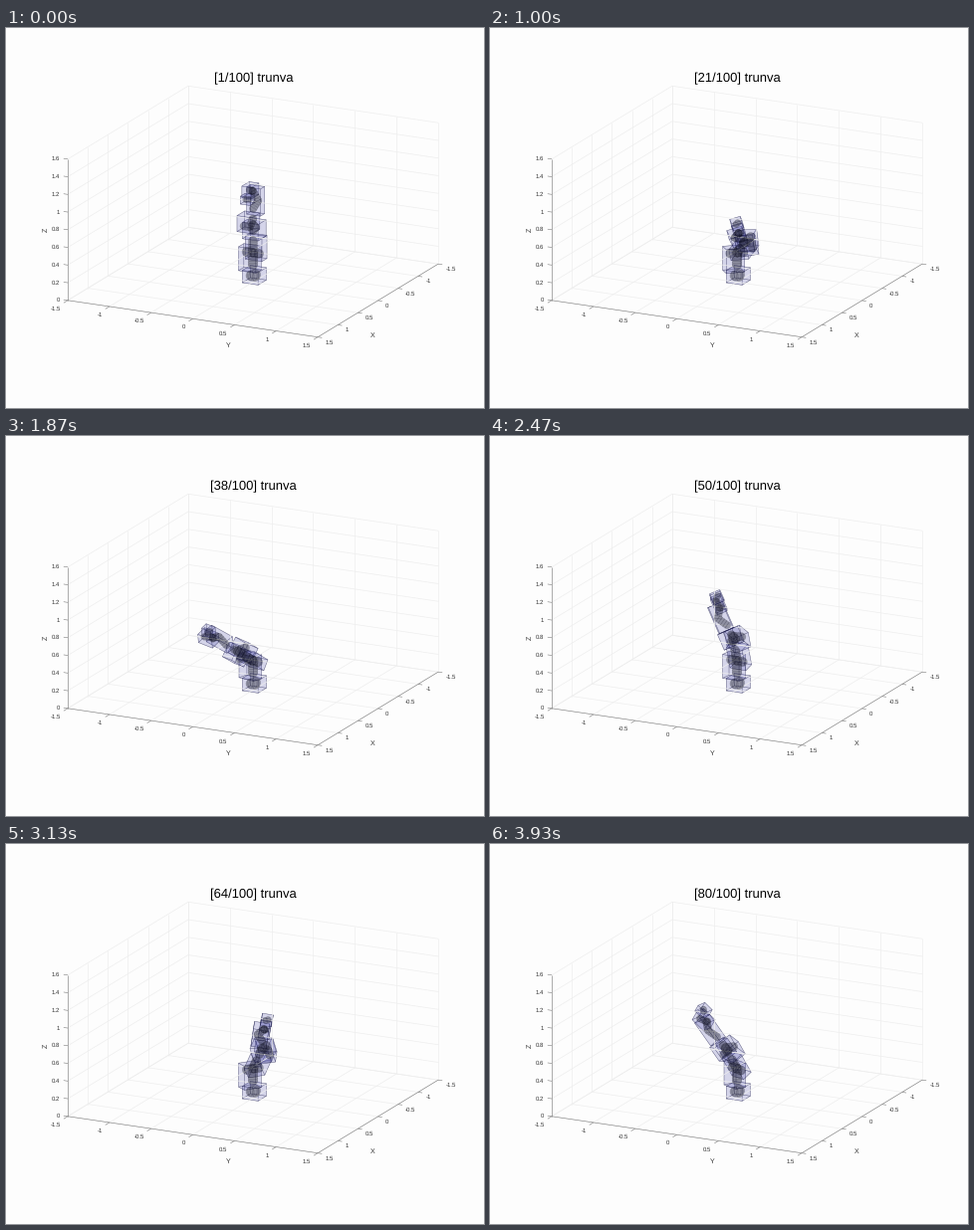
Animation, 480 px wide and 382 px high, one loop 3990 ms. Source, as a matplotlib script:

```python
import matplotlib.pyplot as plt
import numpy as np
from matplotlib.animation import FuncAnimation
from matplotlib.collections import LineCollection, PolyCollection

W, H, DPI = 480, 382, 100
FRAMES, LOOP = 60, 3990
PX = 72 / DPI

# Screen position of the world origin and of the unit vectors x, y, z
ORIGIN = np.array([248.0, 255.5])
BASIS = np.array([[-40.3, 24.5], [83.7, 12.3], [0, -88.75]])
UNIT = 92.9

# Each link: joint offset, quarter turn about x, centre line of its body
ELBOW, FLANGE = 0.0825, 0.088
LINKS = [
    ((0, 0, 0), 0, [(-0.067, 0, 0.07), (0, -0.025, 0.07), (0, 0.025, 0.07)]),
    ((0, 0, 0.333), 0, [(0, 0, -0.137), (0, 0, 0), (0, -0.075, 0)]),
    ((0, 0, 0), -1, [(0, 0, 0.075), (0, 0, 0), (0, -0.137, 0)]),
    ((0, -0.316, 0), 1, [(0, 0, -0.067), (0, 0, 0), (ELBOW, 0.07, 0)]),
    ((ELBOW, 0, 0), 1, [(0, 0, 0.07), (0, 0, 0), (-ELBOW, 0.07, 0)]),
    ((-ELBOW, 0.384, 0), -1, [(0, 0, -0.204), (0, 0.063, -0.1), (0, 0, 0)]),
    ((0, 0, 0), 1, [(0, 0, 0.02), (0, 0, 0), (FLANGE, 0.035, 0)]),
    ((FLANGE, 0, 0), 1, [(0, 0, 0.07), (0.03, 0.03, 0.07)]),
]
RADII = np.linspace(0.07, 0.044, len(LINKS))

# Key poses: step, then the angles of the first five joints
KEYS = np.array([
    (1, 0, 0, 0, 0, 0),
    (13, 1.13, 0.64, 0.5, 0.1, 0.2),
    (29, 0.1, 1.08, 2.2, 0.6, 2.6),
    (38, -0.25, 1.0, 1.44, 0.3, 0.8),
    (44, -0.8, 1.05, 1.5, 0.7, 2.2),
    (50, -0.1, 0.3, 1.04, 0.6, 2.7),
    (64, 0.95, 0.62, 1.4, 0.2, 1.2),
    (70, 1.1, 0.8, 1.0, 0.1, 1.0),
    (80, -0.45, 0.55, 1.36, 0.43, 2.1),
])
STEPS, ANGLES = KEYS[:, 0], KEYS[:, 1:]
SLOPES = np.gradient(ANGLES, STEPS, axis=0)


def project(p):
    return ORIGIN + np.asarray(p, float) @ BASIS


def joint_angles(step):
    """Cubic curve through the key poses; the wrist eases into its bend."""
    k = min(np.searchsorted(STEPS, step, side="right") - 1, len(STEPS) - 2)
    h = STEPS[k + 1] - STEPS[k]
    u = (step - STEPS[k]) / h
    arm = ((1 + 2 * u) * (1 - u) ** 2 * ANGLES[k]
           + u * (1 - u) ** 2 * h * SLOPES[k]
           + u * u * (3 - 2 * u) * ANGLES[k + 1]
           + u * u * (u - 1) * h * SLOPES[k + 1])
    wrist = 1.8 * (1 - np.exp((1 - step) / 12))
    return [0, *arm, wrist, 0]


def link_frames(angles):
    """Rotation and position of every link, from the base outward."""
    rot, pos = np.eye(3), np.zeros(3)
    for (offset, turn, _), a in zip(LINKS, angles):
        pos = pos + rot @ np.array(offset)
        c, s = 1 - abs(turn), turn
        roll = np.array([[1, 0, 0], [0, c, -s], [0, s, c]])
        ca, sa = np.cos(a), np.sin(a)
        rot = rot @ roll @ np.array([[ca, -sa, 0], [sa, ca, 0], [0, 0, 1]])
        yield rot, pos


def box_faces(path, r):
    """Six faces of the box around a tube."""
    lo, hi = path.min(axis=0) - r, path.max(axis=0) + r
    faces = []
    for axis in range(3):
        a, b = [i for i in range(3) if i != axis]
        for side in (lo, hi):
            face = np.empty((4, 3))
            face[:, axis] = side[axis]
            face[:, a] = [lo[a], hi[a], hi[a], lo[a]]
            face[:, b] = [lo[b], lo[b], hi[b], hi[b]]
            faces.append(face)
    return np.array(faces)


def tube_rings(path, r):
    """Wire rings around a bent tube."""
    t = np.linspace(0, 2 * np.pi, 13)[:, None]
    rings = []
    for p, q in zip(path[:-1], path[1:]):
        d = q - p
        size = np.linalg.norm(d)
        u = np.cross(d, np.eye(3)[np.argmin(abs(d))])
        u /= np.linalg.norm(u)
        v = np.cross(d / size, u)
        for f in np.linspace(0, 1, max(2, int(size / 0.022))):
            rings.append(p + f * d + r * (np.cos(t) * u + np.sin(t) * v))
    return np.array(rings)


PATHS = [np.array(path) for *_, path in LINKS]
FACES = [box_faces(p, r) for p, r in zip(PATHS, RADII)]
RINGS = [tube_rings(p, 0.8 * r) for p, r in zip(PATHS, RADII)]

plt.rcParams.update({"font.family": "Liberation Sans", "text.hinting": "none",
                     "text.hinting_factor": 1})
fig = plt.figure(figsize=(W / DPI, H / DPI), dpi=DPI, facecolor="#fdfdfd")
ax = fig.add_axes([0, 0, 1, 1])
ax.set(xlim=(0, W), ylim=(H, 0))
ax.axis("off")


def label(x, y, s, size=6.4, **kw):
    kw = {"ha": "center", "va": "center", "color": "#333333"} | kw
    return ax.text(x, y, s, fontsize=size * PX, **kw)


def lines(segs, color, lw):
    ax.add_collection(LineCollection(segs, colors=color, linewidths=lw * PX))


def draw_axes():
    lo, hi, top = -1.5, 1.5, 1.6
    grid, ticks = [], []
    for v in np.linspace(lo, hi, 7):
        grid += [[(v, lo, 0), (v, hi, 0)], [(lo, v, 0), (hi, v, 0)],
                 [(v, lo, 0), (v, lo, top)], [(lo, v, 0), (lo, v, top)]]
        ticks += [[(v, hi, 0), (v, hi + 0.05, 0)],
                  [(hi, v, 0), (hi + 0.1, v, 0)]]
        x, y = project((v, hi, 0))
        label(x + 7.5, y + 5.5, f"{v:g}", ha="left")
        x, y = project((hi, v, 0))
        label(x - 7, y + 8.5, f"{v:g}", ha="right")
    for z in np.linspace(0, top, 9):
        grid += [[(lo, lo, z), (lo, hi, z)], [(lo, lo, z), (hi, lo, z)]]
        ticks.append([(hi, lo, z), (hi, lo - 0.05, z)])
        x, y = project((hi, lo, z))
        label(x - 8, y, f"{z:g}", ha="right")
    edges = [[(hi, lo, 0), (hi, lo, top)], [(hi, lo, 0), (hi, hi, 0)],
             [(hi, hi, 0), (lo, hi, 0)]]
    lines([project(s) for s in grid], "#eeeeee", 0.7)
    lines([project(s) for s in edges + ticks], "#808080", 0.6)
    label(368.5, 309.5, "X", 7.4)
    label(223.5, 319.5, "Y", 7.4)
    label(40, 203, "Z", 7.4, rotation=90)
    lines([[(479.5, 0), (479.5, H)], [(0, 381.5), (W, 381.5)]], "#a0a0a0", 1)


draw_axes()
title = label(248.5, 51, "", 13, color="black")

bodies = [ax.plot([], [], color="#1c1e2c", alpha=0.38,
                  lw=1.6 * r * UNIT * PX, solid_capstyle="round",
                  solid_joinstyle="round")[0] for r in RADII]
wire = LineCollection([], colors=[(0.05, 0.05, 0.12, 0.25)], linewidths=0.3)
hulls = PolyCollection([], facecolors=[(0.2, 0.2, 0.62, 0.1)],
                       edgecolors=[(0.1, 0.1, 0.28, 0.4)], linewidths=0.32)
ax.add_collection(wire)
ax.add_collection(hulls)


def draw(i):
    step = round(1 + 4 * i / 3)
    title.set_text(f"[{step}/100] trunva")
    rings, faces = [], []
    for k, (rot, pos) in enumerate(link_frames(joint_angles(step))):
        bodies[k].set_data(*project(PATHS[k] @ rot.T + pos).T)
        rings.extend(project(RINGS[k] @ rot.T + pos))
        faces.extend(project(FACES[k] @ rot.T + pos))
    wire.set_segments(rings)
    hulls.set_verts(faces)
    return [title, wire, hulls, *bodies]


anim = FuncAnimation(fig, draw, frames=FRAMES, interval=LOOP / FRAMES,
                     repeat=True, repeat_delay=0, blit=False)
plt.show()
```
